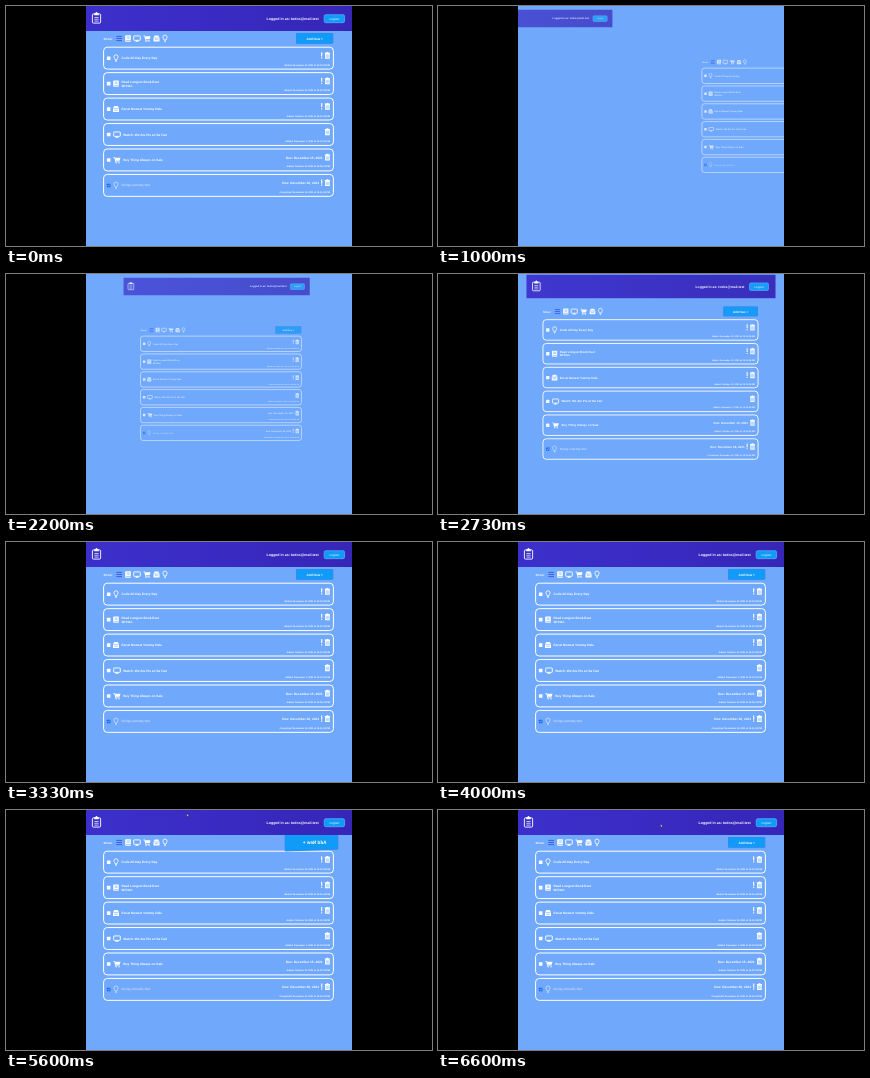
An HTML page for the animation above (6.67 s loop, 426 by 240 pixels).

```html
<!DOCTYPE html>
<html lang="en">
<head>
<meta charset="utf-8">
<title>Task list</title>
<style>
  html, body { margin: 0; width: 100%; height: 100%; overflow: hidden; background: #000; }
  #page { position: absolute; left: 80px; top: 0; width: 266px; height: 240px; overflow: hidden; background: #70a8fb; }
  .layer { position: absolute; left: 0; top: 0; width: 266px; height: 240px; }
  #content { transform-origin: 133px 111px; }
  #header { transform-origin: 133px 12.5px; }
  svg { position: absolute; left: 0; top: 0; display: block; overflow: visible; }
  text { font: bold 3.2px "Liberation Sans", Arial, sans-serif; fill: #fff; text-rendering: geometricPrecision; }
  text.small { font-size: 2.3px; }
  text.end { text-anchor: end; }
  text.mid { text-anchor: middle; }
</style>
</head>
<body>
<div id="page">
  <div id="content" class="layer">
    <svg width="266" height="240" viewBox="80 0 266 240">
      <defs>
        <g id="bulb" fill="none" stroke="#fff" stroke-width=".8">
          <path d="M-1 1.5C-1 .5-2.1 0-2.1-1.3a2.1 2.1 0 0 1 4.2 0C2.1 0 1 .5 1 1.5Z"/>
          <path d="M-1 2.5H1M-.5 3.3H.5"/>
        </g>
        <g id="book">
          <path fill="#fff" d="M-2-3.2H2.8V3.2H-2Q-2.8 3.2-2.8 2.4V-2.4Q-2.8-3.2-2-3.2Z"/>
          <path stroke="#70a8fb" stroke-width=".6" d="M-1.2-1.6H1.6M-1.2-.3H1.6M-1.9 2H2.8"/>
        </g>
        <g id="screen">
          <rect x="-3.3" y="-2.6" width="6.6" height="4.4" rx=".5" fill="none" stroke="#fff" stroke-width=".9"/>
          <path fill="#fff" d="M-.7 1.8H.7L1 2.7H1.8V3.3H-1.8V2.7H-1Z"/>
        </g>
        <g id="cart" fill="#fff">
          <path d="M-3.6-3H-2.2L-1.9-2.2H3.5L2.7 .8H-1.2L-1 1.4H2.5V2H-1.6L-2.7-2.3H-3.6Z"/>
          <circle cx="-.9" cy="2.8" r=".7"/><circle cx="2" cy="2.8" r=".7"/>
        </g>
        <g id="store">
          <path fill="#fff" d="M-1.8-3H1.8L3-.8V3H-3V-.8Z"/>
          <path fill="none" stroke="#70a8fb" stroke-width=".6" d="M-2.6-.5H2.6M-1.6 1.2H1.6"/>
        </g>
        <g id="bin">
          <path fill="#fff" d="M-2.7-2.7H-1V-3.4H1V-2.7H2.7V-1.9H2.3V3.4H-2.3V-1.9H-2.7Z"/>
          <path stroke="#70a8fb" stroke-width=".45" d="M-1-.9V2.4M0-.9V2.4M1-.9V2.4"/>
        </g>
      </defs>
      <text x="97.6" y="33.6" style="font-size:3px">Show:</text>
      <path d="M110.3 30.4H116M110.3 32.5H116M110.3 34.6H116" stroke="#3c5fe8" stroke-width="1"/>
      <g id="list"></g>
      <g transform="translate(308.7 32.4)">
        <path id="addFace" fill="#109bf8" stroke="#2b8cf0" stroke-width="1" stroke-linejoin="round"/>
        <text id="addLabel" class="mid" y="1.2">Add New +</text>
      </g>
    </svg>
  </div>
  <div id="header" class="layer">
    <svg width="266" height="240" viewBox="80 0 266 240">
      <defs>
        <linearGradient id="bar">
          <stop stop-color="#3c30cc"/><stop offset="1" stop-color="#3626b8"/>
        </linearGradient>
      </defs>
      <rect x="80" width="266" height="25" fill="url(#bar)"/>
      <g transform="translate(0 -.7)">
        <g fill="none" stroke="#fff">
          <rect x="86.4" y="8.6" width="8.2" height="9.2" rx="1" stroke-width=".9"/>
          <path d="M88.4 12.2H92.6M88.4 14H92.6M88.4 15.8H92.6" stroke-width=".7"/>
        </g>
        <path fill="#fff" d="M88.2 10V8H89.3Q90.5 5.6 91.7 8H92.8V10Z"/>
      </g>
      <text x="312.8" y="13.7" class="end" style="font-size:3.6px">Logged in as: todos@mail.test</text>
      <rect x="318.2" y="8.7" width="20.4" height="8" rx="1.6" fill="#109bf8" stroke="#5ab4f8" stroke-width=".7"/>
      <text x="328.4" y="13.8" class="mid" style="font-weight:400">Logout</text>
    </svg>
  </div>
  <svg id="cursor" width="3" height="4" viewBox="0 0 3 4">
    <path d="M.3 .2V3.2L1.1 2.5L1.6 3.6L2.1 3.4L1.7 2.3H2.6Z" fill="#fff" stroke="#111" stroke-width=".4"/>
  </svg>
</div>
<script>
const LOOP = 6670, START = 40, FIRST_PAINT = 70;
const PX = 266 / 1280; // page pixels to stage pixels
const $ = id => document.getElementById(id);

const tasks = [
  { icon: "bulb", lines: ["Code All Day Every Day"], urgent: true, note: "Added: December 12, 2021 at 12:10:09 PM" },
  { icon: "book", lines: ["Read Longest Book Ever", "Written"], urgent: true, note: "Added: December 12, 2021 at 12:10:45 PM" },
  { icon: "store", lines: ["Eat at Newest Yummy Dale"], urgent: true, note: "Added: October 12, 2021 at 12:12:08 PM" },
  { icon: "screen", wide: true, lines: ["Watch: We Ate Pie at the Fair"], note: "Added: December 7, 2021 at 12:14:00 PM" },
  { icon: "cart", wide: true, lines: ["Buy Thing Always on Sale"], due: "Due: December 15, 2021", note: "Added: October 12, 2021 at 12:15:00 PM" },
  { icon: "bulb", lines: ["Doing Literally Out"], urgent: true, done: true, due: "Due: December 26, 2021", note: "Completed: December 12, 2021 at 12:16:40 PM" }
];

const icon = (name, x, y) => `<use href="#${name}" x="${x}" y="${y}"/>`;
const label = (x, y, text, cls = "") => `<text x="${x}" y="${y}" class="${cls}">${text}</text>`;

function taskMarkup(task, i) {
  const top = 41.2 + i * 25.45, mid = top + 11;
  const lineY = n => mid + 1 + (n - (task.lines.length - 1) / 2) * 3.8;
  const box = `<rect x="100.9" y="${mid - 1.8}" width="3.6" height="3.6" rx=".5" fill="${task.done ? "#1769e8" : "#fff"}"/>`;
  const tick = task.done ? `<path d="M101.6 ${mid}l.8 .8l1.4-1.7" fill="none" stroke="#fff" stroke-width=".5"/>` : "";
  const title = icon(task.icon, task.wide ? 111 : 110, mid)
    + task.lines.map((text, n) => label(task.wide ? 117.3 : 115.5, lineY(n), text)).join("");
  return `<rect x="97.6" y="${top}" width="229.8" height="21.9" rx="3.6" fill="none" stroke="#fff" stroke-width="1"/>`
    + box + tick + `<g opacity="${task.done ? 0.6 : 1}">${title}</g>`
    + icon("bin", 321.4, top + 8.2)
    + (task.urgent ? `<path d="M315.7 ${top + 5}v4.2m0 .9v1.2" stroke="#fff" stroke-width="1.1"/>` : "")
    + (task.due ? label(task.urgent ? 313 : 316.5, top + 9.6, task.due, "end") : "")
    + label(324, top + 18.4, task.note, "small end");
}

const filters = [["book", 122], ["screen", 131], ["cart", 141], ["store", 150.5], ["bulb", 159]];
$("list").innerHTML = filters.map(([name, x]) => icon(name, x, 32.5)).join("") + tasks.map(taskMarkup).join("");

function bezier(x1, y1, x2, y2) {
  const at = (a, b, s) => 3 * a * s * (1 - s) ** 2 + 3 * b * s * s * (1 - s) + s ** 3;
  return x => {
    let lo = 0, hi = 1;
    for (let i = 0; i < 24; i++) {
      const s = (lo + hi) / 2;
      if (at(x1, x2, s) < x) lo = s; else hi = s;
    }
    return at(y1, y2, (lo + hi) / 2);
  };
}
const ease = bezier(0.25, 0.1, 0.25, 1);
const easeIn = bezier(0.42, 0, 1, 1);
const easeOut = bezier(0, 0, 0.58, 1);
const clamp = x => Math.min(1, Math.max(0, x));
const mix = (a, b, k) => a + (b - a) * k;

// Slides in at reduced size, then grows to full size.
function backIn(p) {
  const slide = ease(clamp(p / 0.8)), grow = ease(clamp((p - 0.8) / 0.2));
  return { shift: 2000 * PX * (1 - slide), scale: mix(0.7, 1, grow) };
}

function place(el, direction, { shift, scale }) {
  el.style.transform = scale === 1 ? "none" : `translateX(${direction * shift}px) scale(${scale})`;
  el.style.opacity = scale;
}

// Each stop: progress, depth, angle, scale, easing towards the next stop.
const flipStops = [
  [0, 0, -360, 1, easeOut],
  [0.4, 150, -190, 1, easeOut],
  [0.5, 150, -170, 1, easeIn],
  [0.8, 0, 0, 0.95, easeIn],
  [1, 0, 0, 1]
];
function flipPose(p) {
  const i = Math.max(0, flipStops.findLastIndex(stop => stop[0] <= p && stop[4]));
  const a = flipStops[i], b = flipStops[i + 1];
  const k = a[4](clamp((p - a[0]) / (b[0] - a[0])));
  return [1, 2, 3].map(n => mix(a[n], b[n], k));
}

// Turns the button about its vertical axis, seen in perspective.
function flipButton(p) {
  const [depth, degrees, scale] = flipPose(p);
  const angle = degrees * Math.PI / 180, eye = 400 * PX;
  const project = (x, y) => {
    const zoom = scale * eye / (eye - depth * PX + x * Math.sin(angle));
    return [x * Math.cos(angle) * zoom, y * zoom];
  };
  const w = 18.1, h = 4.9;
  $("addFace").setAttribute("d", `M${[project(-w, -h), project(w, -h), project(w, h), project(-w, h)].join("L")}Z`);
  const zoom = scale * eye / (eye - depth * PX);
  $("addLabel").setAttribute("transform", `scale(${zoom * Math.cos(angle)} ${zoom})`);
}

function render(t) {
  const age = t - START;
  const pose = backIn(t < FIRST_PAINT ? 1 : age / 3000);
  place($("header"), -1, pose);
  place($("content"), 1, pose);
  flipButton(clamp((age - 5000) / 1000));

  const travel = clamp((t - 5600) / 1000);
  const cursor = $("cursor").style;
  cursor.visibility = t >= 5530 ? "visible" : "hidden";
  cursor.transform = `translate(${mix(100.5, 142.3, travel)}px, ${mix(3.5, 14, travel)}px)`;
}

const origin = performance.now();
function tick() {
  render((performance.now() - origin) % LOOP);
  requestAnimationFrame(tick);
}
render(0);
requestAnimationFrame(tick);
</script>
</body>
</html>
```
